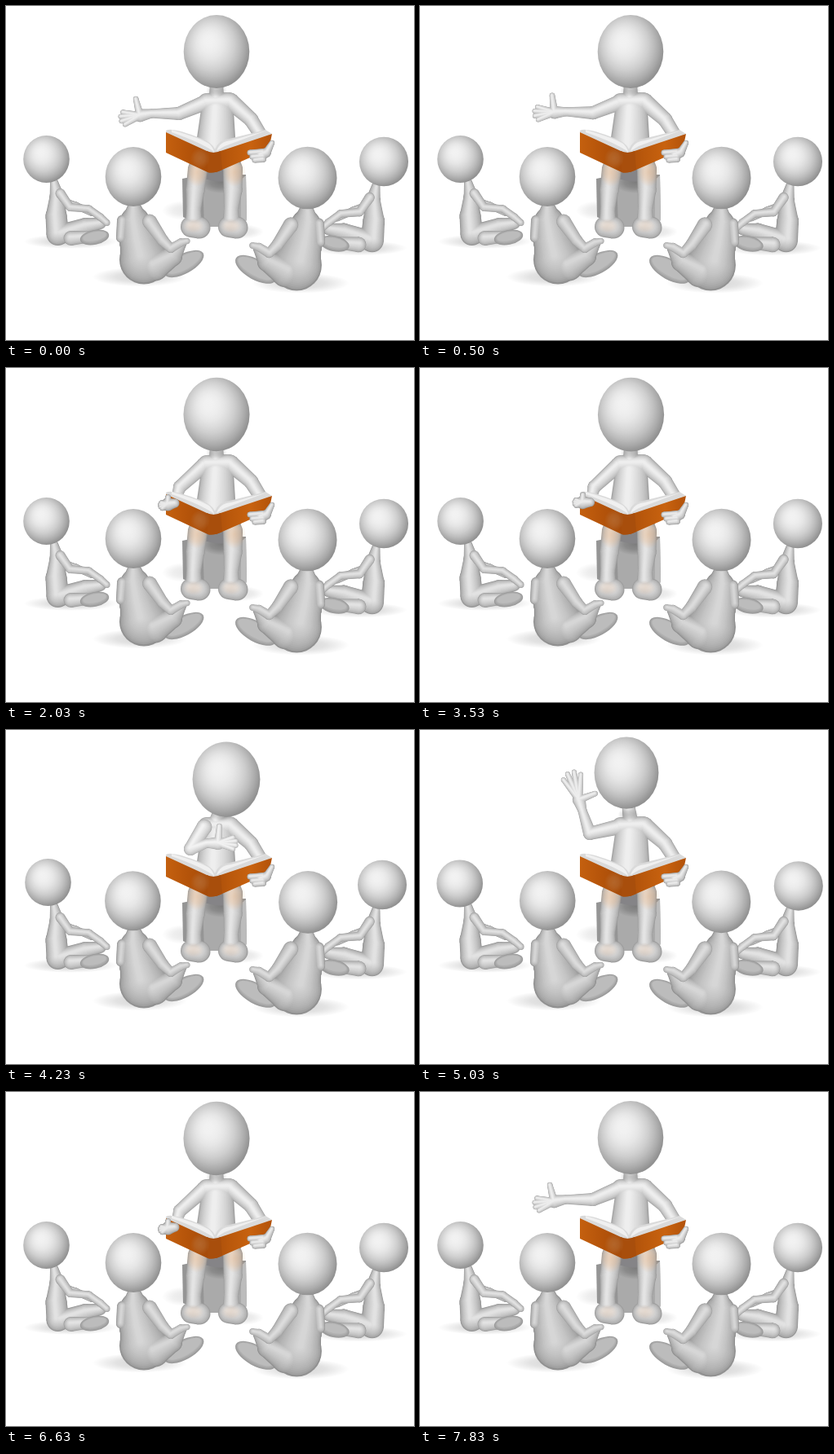
Animation, 500 px wide and 410 px high, one loop 7.93 s. Source, as an HTML page with a canvas:

```html
<!DOCTYPE html>
<html lang="en">
<head>
<meta charset="utf-8">
<title>Story time</title>
<style>
html, body { margin: 0; width: 100%; height: 100%; overflow: hidden; background: #fff; }
canvas { display: block; }
</style>
</head>
<body>
<canvas id="stage" width="500" height="410"></canvas>
<script>
const ctx = document.getElementById('stage').getContext('2d');
const LOOP = 7930, RAD = Math.PI / 180;
const SHOULDER = [243, 119];

// head x y, elbow x y, wrist x y, hand angle, finger length, thumb side, listeners' lean
const POSES = {
  out:   [258, 56, 212, 132, 178, 132, 170, 24, 1, 0],
  wave:  [258, 56, 212, 127, 182, 118, 213, 27, 1, 0],
  book:  [258, 57, 213, 146, 207, 166, 170, 9, 1.2, 0],
  chest: [270, 60.5, 226, 146, 246, 139, 360, 22, -1, 1],
  raise: [253, 52.5, 208, 127, 199, 99, 253, 35, 1, -.4],
  reach: [235, 57.5, 206, 133, 172, 122, 168, 25, 1, 0]
};
const KEYS = [
  [0, 'out'], [300, 'out'], [1100, 'wave'], [1490, 'out'], [2030, 'book'], [3430, 'book'],
  [4230, 'chest'], [5030, 'raise'], [5630, 'reach'], [6130, 'reach'], [6630, 'book'],
  [7530, 'book'], [7830, 'out'], [LOOP, 'out']
];

function poseAt(t) {
  const i = KEYS.findLastIndex(k => k[0] <= t);
  const [t0, a] = KEYS[i], [t1, b] = KEYS[i + 1];
  const u = (t - t0) / (t1 - t0), e = u * u * (3 - 2 * u);
  return POSES[a].map((v, j) => v + (POSES[b][j] - v) * e);
}

// Motion advances in steps of about a tenth of a second
function snap(t) {
  const [from, gap] = t < 1100 ? [0, 100] : t < 1630 ? [1100, 130] : [1630, 100];
  return from + Math.floor((t - from) / gap) * gap;
}

const grey = v => `rgb(${Math.round(v)},${Math.round(v)},${Math.round(v)})`;

function flat(d, fill) {
  ctx.fillStyle = fill;
  ctx.fill(new Path2D(d));
}

function disc(x, y, r) {
  ctx.beginPath();
  ctx.arc(x, y, r, 0, 7);
  ctx.fill();
}

// Unit circle in a stretched frame, filled with a radial gradient
function oval(x, y, rx, ry, fx, fy, stops) {
  ctx.save();
  ctx.translate(x, y);
  ctx.scale(rx, ry);
  const g = ctx.createRadialGradient(fx, fy, 0, fx * .4, fy * .4, 1.12);
  stops.forEach(([at, colour]) => g.addColorStop(at, colour));
  ctx.fillStyle = g;
  disc(0, 0, 1);
  ctx.restore();
}

const spot = (x, y, rx, ry, alpha, rgb = '110,110,110') =>
  oval(x, y, rx, ry, 0, 0, [[0, `rgba(${rgb},${alpha})`], [.45, `rgba(${rgb},${alpha * .7})`], [.89, `rgba(${rgb},0)`]]);

function ball(x, y, rx, ry, edge = 145) {
  const stops = [];
  for (let u = 0; u <= 1; u += .125) stops.push([u, grey(242 - (242 - edge) * u ** 2.1)]);
  oval(x, y, rx, ry, -.25, -.3, stops);
}

function capsule(x, y, r, X, Y, R) {
  const len = Math.hypot(X - x, Y - y) || 1, nx = (y - Y) / len, ny = (X - x) / len;
  disc(x, y, r);
  disc(X, Y, R);
  ctx.beginPath();
  ctx.moveTo(x + nx * r, y + ny * r);
  ctx.lineTo(X + nx * R, Y + ny * R);
  ctx.lineTo(X - nx * R, Y - ny * R);
  ctx.lineTo(x - nx * r, y - ny * r);
  ctx.fill();
}

// Chains of x, y, radius merged into one rounded body, shaded in shrinking layers
function limbs(chains, lo = 162, hi = 238) {
  for (let t = 0; t <= 1; t += 1 / 14) {
    ctx.fillStyle = grey(lo + (hi - lo) * t ** .55);
    const at = (c, j) => [c[j] - c[j + 2] * .15 * t, c[j + 1] - c[j + 2] * .2 * t, c[j + 2] * (1 - .88 * t)];
    for (const c of chains)
      for (let j = 0; j + 5 < c.length; j += 3) capsule(...at(c, j), ...at(c, j + 3));
  }
}

function sole(x, y, rx, ry, turn) {
  for (let i = 0; i < 4; i++) {
    ctx.fillStyle = grey(155 + i * 11);
    ctx.beginPath();
    ctx.ellipse(x, y - i * .4, rx - i * 1.2, ry - i * 1.2, turn, 0, 7);
    ctx.fill();
  }
}

// A listener is built around the head; side -1 mirrors it
function listener(x, y, side, size, lean, body, rx, ry) {
  ctx.save();
  ctx.translate(x, y);
  ctx.scale(side * (1 + (size - 1) * .5), size);
  body();
  ctx.restore();
  ball(x + side * 2 * lean, y - lean, rx * size, ry * size);
}

function backBody() {
  spot(30, 101, 58, 9, .28);
  limbs([[9, 26, 4.5, 13, 46, 9, 12, 70, 13, 14, 92, 14], [18, 92, 12, 48, 82, 10, 66, 79, 7],
    [20, 52, 5, 36, 57, 4.5, 56, 66, 4]], 148, 226);
  limbs([[17, 42, 6, 29, 59, 5, 52, 61, 4.5, 66, 71, 4.5, 74, 78, 4], [30, 97, 9, 54, 95, 7]], 155, 226);
  sole(59, 96, 18, 9, -.2);
}

function frontBody() {
  spot(8, 123, 58, 12, .28);
  sole(62, 107, 27, 12, -.5);
  limbs([[1, 33, 7, 2, 55, 18, 7, 80, 24, 13, 102, 30], [-13, 54, 7, -15, 75, 6],
    [26, 110, 18, 48, 98, 12, 59, 83, 6]], 145, 214);
  limbs([[20, 55, 9, 36, 78, 7, 46, 88, 5.5, 58, 81, 5, 66, 79, 3.5]], 160, 220);
}

function seat() {
  spot(219, 251, 28, 12, .16);
  spot(290, 277, 26, 9, .18);
  flat('M216 212 L240 207 L294 207 L295 262 L288 271 L242 271 L217 259 Z', '#959595');
  flat('M241 213 H288 V271 H243 Z', '#aaa');
  flat('M288 213 L294 208 L295 263 L288 271 Z', '#bcbcbc');
  spot(264, 216, 27, 14, .5, '80,80,80');
}

function legs() {
  flat('M229 190 H288 L284 211 C272 217 252 217 240 210 Z', '#858487');
  for (const x of [232, 278]) {
    limbs([[x + (x < 258 ? 3 : 0), 200, 12, x, 226, 11.5, x - 2, 250, 9, x - 2, 262, 10],
      [x - 5, 271, 13, x + 5, 272, 13.5]], 155, 228);
    spot(x + 2, 204, 14, 18, .34, '236,160,90');
    spot(x - 2, 270, 13, 9, .2, '225,165,115');
  }
}

// Palm, four fanned fingers and a thumb from the wrist
function handParts([, , , , wx, wy, angle, reach, thumb]) {
  const from = (x, y, deg, d) => [x + d * Math.cos(deg * RAD), y + d * Math.sin(deg * RAD)];
  const palm = from(wx, wy, angle, Math.min(14, reach));
  const parts = [[wx, wy, 5.5, ...palm, 8]];
  for (let i = -1.5; i < 2; i++)
    parts.push([...palm, 4.5, ...from(...palm, angle + i * 14 * thumb, reach * (1 - .05 * i * i)), 3]);
  parts.push([...palm, 5, ...from(...palm, angle + 86 * thumb, Math.min(21, reach)), 3.3]);
  return parts;
}

function book() {
  flat('M196 153 Q203 148 240 163 Q252 167 256 176 Q261 164 274 163 L318 152 L326 157 L264 181 L246 180 L196 157 Z', '#dadada');
  flat('M203 152 Q240 163 249 169 Q254 174 255 179 Q240 168 203 155 Z M258 178 Q262 166 276 165 L319 153 L268 172 Z', '#f0f0f0');
  const g = ctx.createLinearGradient(196, 0, 326, 0);
  ['#c4600f', '#b5540a', '#a54b0a', '#b9580c', '#c8620f', '#b2520a'].forEach((c, i) => g.addColorStop(i / 5, c));
  flat('M196 155 L246 178 Q254 182 263 178 L326 157 L322 176 L265 201 Q255 206 247 204 L196 180 Z', g);
  flat('M246 178 Q254 182 263 178 L265 201 Q255 206 247 204 Z', '#a84e0c');
  spot(238, 187, 12, 13, .4, '190,135,90');
}

function teacher(p) {
  const [hx, hy, ex, ey, wx, wy] = p;
  const neck = 258 + (hx - 258) * .5, grow = (hy - 56) * .25;
  const arm = [[...SHOULDER, 9.5, ex, ey, 8, wx, wy, 5.5], ...handParts(p)];
  const trunk = [[neck, 94, 8, 258, 112, 9], [246, 118, 11, 273, 117, 11], [259, 128, 20, 257, 176, 25],
    [275, 117, 10.5, 300, 139, 9, 315, 163, 8]];
  const inFront = wx > 228;
  seat();
  legs();
  limbs(inFront ? trunk : [...trunk, ...arm]);
  spot(neck, 104, 13, 8, .35);
  if (inFront) limbs(arm, 172, 242);
  ball(hx, hy, 40.3 + grow, 45 + grow);
  book();
  limbs([[319, 180, 6, 312, 183, 7], [320, 179, 5, 326, 168, 3.2],
    ...[180, 185, 189].map((y, i) => [315, y - 1, 4, 299 + i * 3, y, 3.5])], 150, 235);
  if (wy > 155) limbs(handParts(p), 150, 235);
}

function draw(t) {
  const p = poseAt(t), lean = p[9];
  ctx.fillStyle = '#fff';
  ctx.fillRect(0, 0, 500, 410);
  listener(49.5, 188, 1, 1, lean, backBody, 28.3, 29);
  listener(463, 191, -1, 1.05, lean, backBody, 28.6, 28.8);
  teacher(p);
  listener(156, 209.5, 1, 1, lean * -.3, frontBody, 34.3, 36.5);
  listener(369.5, 211, -1, 1.05, lean * -.3, frontBody, 34.3, 36.5);
}

let shown = -1;
const began = performance.now();
function tick() {
  const step = snap((performance.now() - began) % LOOP);
  if (step !== shown) draw(shown = step);
  requestAnimationFrame(tick);
}
tick();
</script>
</body>
</html>
```
